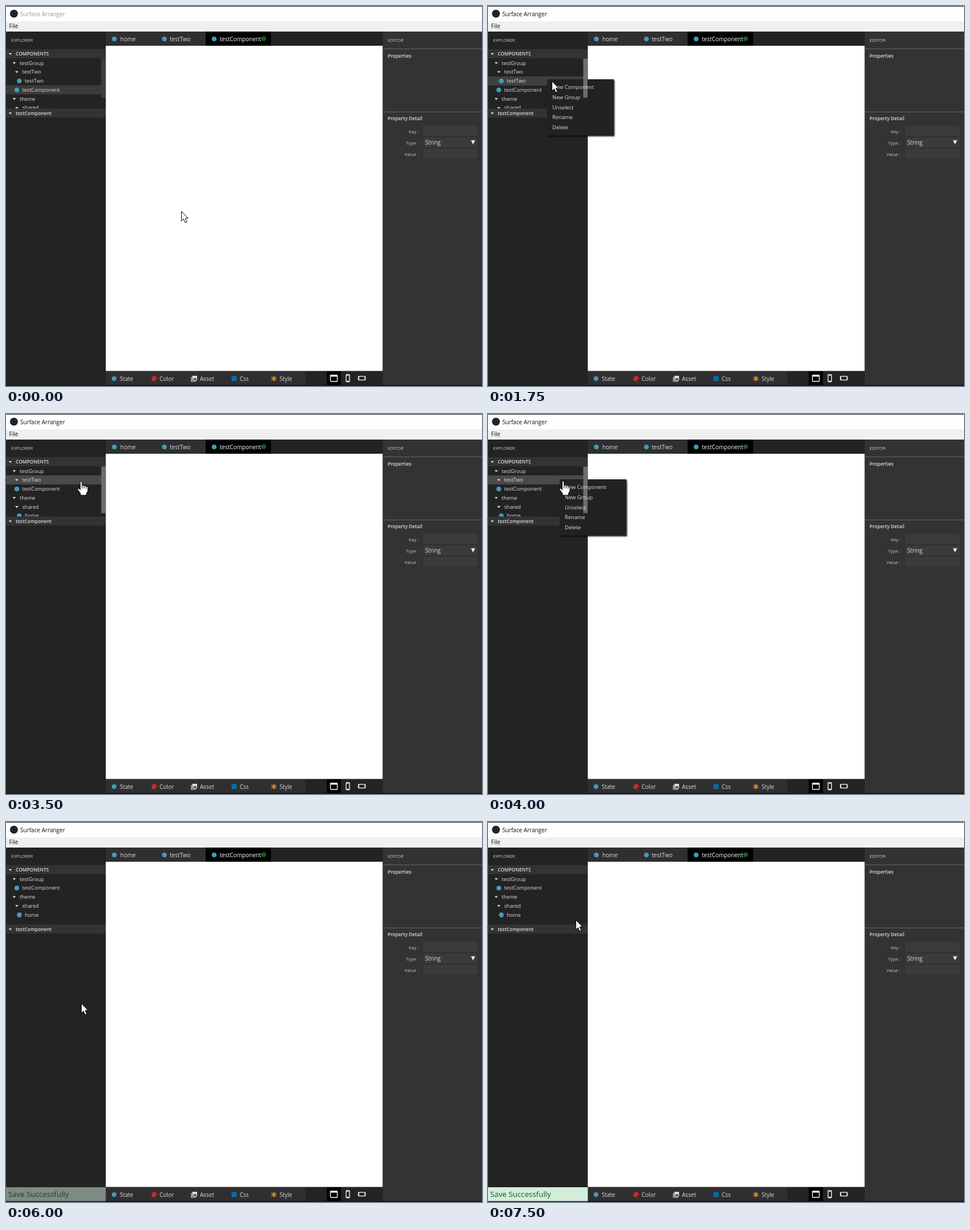
An HTML page for the animation above (8 s loop, 837 by 669 pixels).

```html
<!DOCTYPE html>
<html lang="en">
<head>
<meta charset="utf-8">
<title>Component explorer</title>
<style>
html, body { margin: 0; width: 100%; height: 100%; overflow: hidden; background: #232323; }
svg { display: block; width: 837px; height: 669px; }
text { font: 10px "Open Sans", sans-serif; fill: #ddd; white-space: pre; }
.tree text { font-size: 9.1px; }
.cap { font-size: 8px; fill: #ccc; }
.head { font-size: 8.4px; font-weight: 600; }
.items text { font-size: 9.3px; }
.end { text-anchor: end; }

/* every change is a hard step on a 250 ms grid (3.125%) */
.title, .pick, .leaf, .group, .rest, .bar, .menu, .cursor, .arrow, .hand, .resize, .toast {
  animation: 8s step-end infinite;
}
.title { animation-name: title; }
.pick { animation-name: pick; }
.leaf { animation-name: leaf; }
.group { animation-name: group; }
.rest { animation-name: rest; }
.bar { animation-name: bar; }
.menu { animation-name: menu; }
.cursor { animation-name: cursor; }
.arrow { animation-name: arrow; }
.hand { animation-name: hand; }
.resize { animation-name: resize; }
.toast { animation-name: toast; }

@keyframes title { 0% { fill: #999; } 18.75%, 100% { fill: #111; } }
@keyframes pick {
  0% { transform: translateY(139.5px); fill: #3b3b3b; }
  15.625% { transform: translateY(124px); fill: #404040; }
  34.375% { visibility: hidden; }
  40.625% { transform: translateY(124px); fill: #4a4a4a; visibility: visible; }
  43.75% { transform: translateY(108px); fill: #4a4a4a; visibility: visible; }
  56.25%, 100% { visibility: hidden; }
}
@keyframes leaf { 0% { visibility: visible; } 34.375%, 100% { visibility: hidden; } }
@keyframes group { 0% { visibility: visible; } 56.25%, 100% { visibility: hidden; } }
@keyframes rest {
  0% { transform: none; }
  34.375% { transform: translateY(-15.8px); }
  56.25%, 100% { transform: translateY(-31.6px); }
}
@keyframes bar {
  0% { fill: #3e3e3e; height: 69px; visibility: visible; }
  9.375% { fill: #6d6d6d; height: 69px; visibility: visible; }
  34.375% { fill: #3e3e3e; height: 82px; visibility: visible; }
  37.5% { fill: #6d6d6d; height: 82px; visibility: visible; }
  56.25%, 100% { visibility: hidden; }
}
@keyframes menu {
  0% { visibility: hidden; }
  18.75% { visibility: visible; transform: translate(104px, 129px); }
  34.375% { visibility: hidden; }
  50% { visibility: visible; transform: translate(126px, 115px); }
  56.25%, 100% { visibility: hidden; }
}
@keyframes cursor {
  0% { transform: translate(308px, 361px); }
  3.125% { transform: translate(262px, 300px); }
  6.25% { transform: translate(205px, 235px); }
  9.375% { transform: translate(160px, 178px); }
  12.5% { transform: translate(128px, 144px); }
  15.625% { transform: translate(112px, 132px); }
  25% { transform: translate(120px, 160px); }
  28.125% { transform: translate(129px, 192px); }
  31.25% { transform: translate(136px, 212px); }
  34.375% { transform: translate(175px, 215px); }
  37.5% { transform: translate(160px, 176px); }
  40.625% { transform: translate(143px, 134px); }
  43.75% { transform: translate(132px, 118px); }
  53.125% { transform: translate(148px, 198px); }
  56.25% { transform: translate(187px, 240px); }
  59.375% { transform: translate(125px, 323px); }
  68.75% { transform: translate(129px, 327px); }
  75% { transform: translate(132px, 319px); }
  78.125% { transform: translate(146px, 245px); }
  81.25%, 100% { transform: translate(154px, 172px); }
}
@keyframes arrow {
  0% { visibility: visible; }
  12.5% { visibility: hidden; }
  18.75% { visibility: visible; }
  25% { visibility: hidden; }
  59.375%, 100% { visibility: visible; }
}
@keyframes hand {
  0% { visibility: hidden; }
  12.5% { visibility: visible; }
  18.75% { visibility: hidden; }
  25% { visibility: visible; }
  56.25%, 100% { visibility: hidden; }
}
@keyframes resize {
  0% { visibility: hidden; }
  56.25% { visibility: visible; }
  59.375%, 100% { visibility: hidden; }
}
@keyframes toast { 0% { opacity: 0; } 75% { opacity: .52; } 78.125%, 100% { opacity: 1; } }
</style>
</head>
<body>
<svg viewBox="0 0 837 669">
  <defs>
    <path id="caret" d="M-3-1.5H3L0 1.8Z" fill="#ddd"/>
    <circle id="dot" r="4.3" fill="#3f9db8"/>
    <clipPath id="list"><path d="M0 92H175V180.500H0Z"/></clipPath>
    <filter id="shade" x="-10%" y="-10%" width="125%" height="125%">
      <feDropShadow dx="1.500" dy="1.500" stdDeviation="1.300" flood-color="#000" flood-opacity=".9"/>
    </filter>
  </defs>

  <!-- window -->
  <rect width="837" height="669" fill="#232323"/>
  <rect width="837" height="27" fill="#fff"/>
  <rect width="837" height="1" fill="#222"/>
  <rect y="27" width="837" height="18" fill="#f0f0f0"/>
  <circle cx="14" cy="13.500" r="7" fill="#20242e"/>
  <text class="title" x="25" y="17.500">Surface Arranger</text>
  <text x="5.500" y="39" style="fill:#111">File</text>

  <!-- tabs and page -->
  <rect x="176" y="45" width="175" height="25" fill="#2f2f2f"/>
  <rect x="351" y="45" width="115" height="25" fill="#000"/>
  <use href="#dot" x="190.500" y="58"/>
  <text x="201" y="61.500">home</text>
  <use href="#dot" x="278.500" y="58"/>
  <text x="288" y="61.500">testTwo</text>
  <use href="#dot" x="366" y="58"/>
  <text x="376" y="61.500" style="fill:#fff;font-weight:500">testComponent</text>
  <circle cx="453" cy="57.500" r="4.200" fill="#1b5e20"/>
  <rect x="175.500" y="70" width="487" height="572.500" fill="#fff"/>

  <!-- explorer -->
  <text class="cap" x="9" y="63">EXPLORER</text>
  <rect y="76" width="175" height="16" fill="#333"/>
  <use href="#caret" x="7.500" y="84.500"/>
  <text class="head" x="17" y="87">COMPONENTS</text>
  <g class="tree" clip-path="url(#list)">
    <rect class="pick" width="175" height="16"/>
    <use href="#caret" x="14.500" y="100.500"/>
    <text x="24" y="103.500">testGroup</text>
    <g class="group">
      <use href="#caret" x="19" y="116.300"/>
      <text x="28.500" y="119.300">testTwo</text>
    </g>
    <g class="leaf">
      <use href="#dot" x="23.500" y="132"/>
      <text x="33" y="135">testTwo</text>
    </g>
    <g class="rest">
      <use href="#dot" x="19" y="147.800"/>
      <text x="28.500" y="150.800">testComponent</text>
      <use href="#caret" x="14.500" y="163.600"/>
      <text x="24" y="166.600">theme</text>
      <use href="#caret" x="19" y="179.400"/>
      <text x="28.500" y="182.400">shared</text>
      <use href="#dot" x="23.500" y="195.200"/>
      <text x="33" y="198.200">home</text>
    </g>
  </g>
  <rect y="180.500" width="175" height="16" fill="#333"/>
  <use href="#caret" x="7.500" y="189"/>
  <text class="head" x="17" y="191.500">testComponent</text>

  <!-- editor -->
  <rect x="662.500" y="45" width="174.500" height="622" fill="#333"/>
  <path d="M662.500 75.500H837M662.500 186.500H837" stroke="#666"/>
  <text class="cap" x="671" y="63">EDITOR</text>
  <text class="head" x="671" y="90.500">Properties</text>
  <text class="head" x="671" y="201">Property Detail</text>
  <text class="cap end" x="725.500" y="224">Key :</text>
  <text class="cap end" x="725.500" y="244">Type :</text>
  <text class="cap end" x="725.500" y="264">Value :</text>
  <path d="M734 211H829V228.500H734ZM734 232H829V248.500H734ZM734 251.500H829V268.500H734Z" fill="#3b3b3b"/>
  <text x="737" y="244">String</text>
  <path d="M817.500 236.500H825L821.200 243.500Z" fill="#eee"/>

  <!-- bottom bar -->
  <rect x="176" y="643" width="350.500" height="24" fill="#2f2f2f"/>
  <rect x="564" y="643" width="25" height="24" fill="#000"/>
  <rect y="667.500" width="837" height="1.500" fill="#151515"/>
  <use href="#dot" x="190" y="656"/>
  <text x="200" y="659.500">State</text>
  <circle cx="260.500" cy="656" r="4.700" fill="#d32f2f"/>
  <g fill="#2f2f2f">
    <circle cx="258" cy="655.500" r=".8"/><circle cx="259.700" cy="653.300" r=".8"/>
    <circle cx="262.300" cy="653.500" r=".8"/><circle cx="263" cy="658.700" r="1.700"/>
  </g>
  <text x="270" y="659.500">Color</text>
  <path d="M326 653V661H334" fill="none" stroke="#ddd" stroke-width="1.200"/>
  <rect x="327.500" y="651" width="8.500" height="8.500" rx="1" fill="#ddd"/>
  <path d="M328.500 658L330.500 655 332 656.500 333.500 654.500 335.300 658Z" fill="#333"/>
  <text x="341" y="659.500">Asset</text>
  <rect x="396.500" y="651.500" width="9" height="9" fill="#0b6ca8"/>
  <text x="411" y="659.500">Css</text>
  <path d="M471 651V661M466.700 653.500L475.300 658.500M475.300 653.500L466.700 658.500" stroke="#f58a12" stroke-width="1.800"/>
  <text x="481" y="659.500">Style</text>
  <g fill="none" stroke="#fff" stroke-width="1.300">
    <rect x="570.500" y="650" width="12" height="11" rx="1"/>
    <path d="M570 651H583" stroke-width="3"/>
    <rect x="598" y="649" width="6" height="12.500" rx="1"/>
    <path d="M598 650H604M598 660.500H604" stroke="#ddd"/>
    <rect x="619.500" y="652" width="12.500" height="6.500" rx="1" stroke="#ddd"/>
    <path d="M620.500 652V658.500M631 652V658.500" stroke="#ddd"/>
  </g>

  <g class="toast">
    <rect y="643" width="175.500" height="24.500" fill="#d4edda"/>
    <text x="4" y="660" style="font-size:13.300px;fill:#155724">Save Successfully</text>
  </g>

  <!-- context menu; the scrollbar lies between its back and its labels -->
  <rect class="menu" width="117" height="99" fill="#222" filter="url(#shade)"/>
  <rect class="bar" x="167.500" y="92.500" width="7.500" height="69"/>
  <g class="menu items">
    <text x="9" y="17.300">New Component</text>
    <text x="9" y="34.900">New Group</text>
    <text x="9" y="52.500">Unselect</text>
    <text x="9" y="70.100">Rename</text>
    <text x="9" y="87.700">Delete</text>
  </g>

  <g class="cursor">
    <path class="arrow" d="M.5.5V17.500L4.300 13.900 7 20.300 10 19 7.300 12.700H12.300Z" fill="#fff" stroke="#000"/>
    <path class="hand" d="M-1.500 1.500Q0-.5 1.800 1.500V8Q4 6.500 5.300 8.700 7.500 7.500 8.800 9.700 11 9 12 11.500V17.500L9.500 22V25H-1V22L-6 15Q-6.500 12.500-4 12.800L-1.500 15.500ZM5.300 9V13M8.800 10V13.500M1.800 8V13" fill="#fff" stroke="#000"/>
    <path class="resize" d="M-1-8V8M1.500-8V8M3 0H11M8-3L11 0 8 3M-11 0H-7M-9-2.500V2.500" fill="none" stroke="#e6e6e6"/>
  </g>
</svg>
</body>
</html>
```
